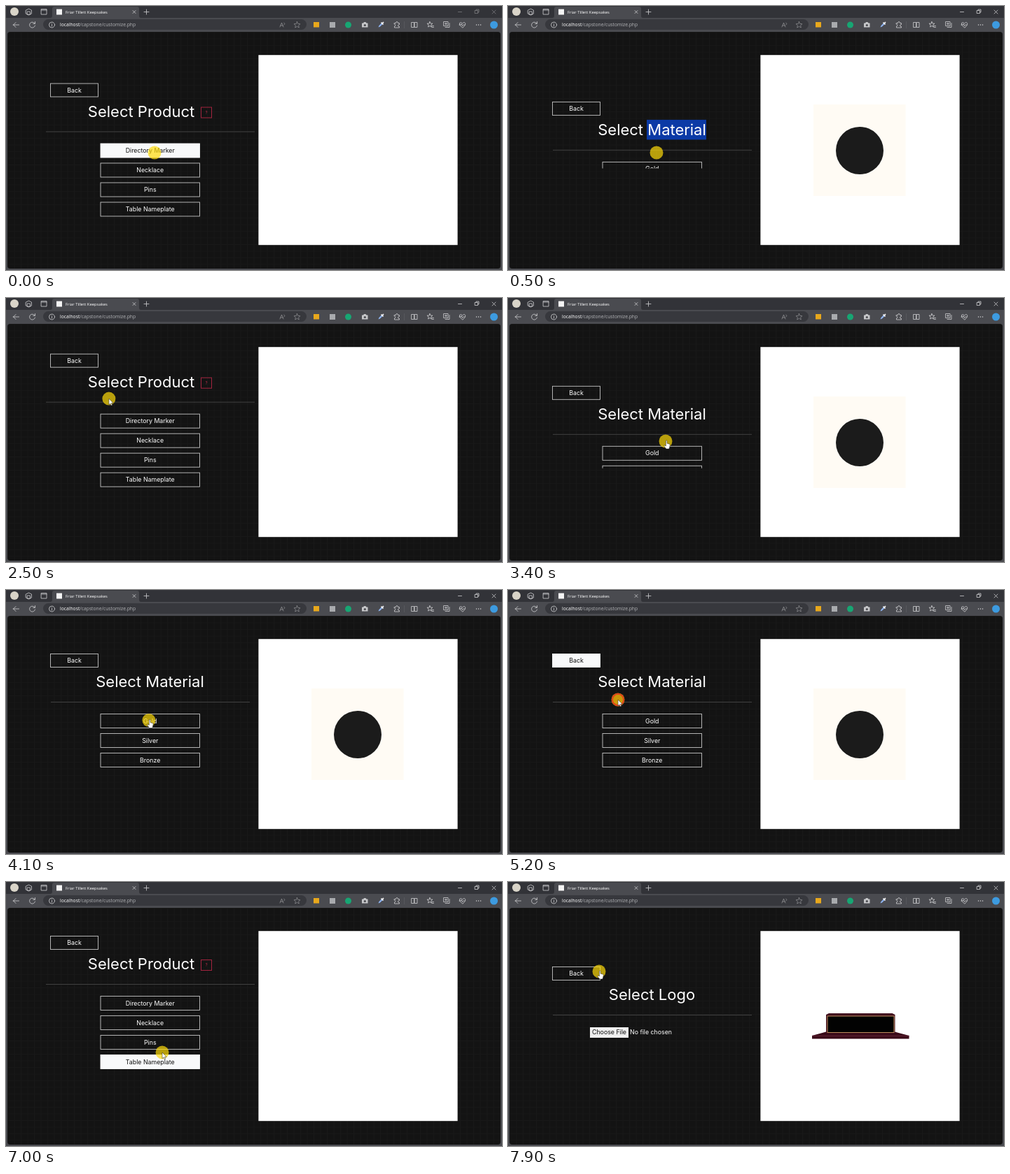
Write an HTML page that moves like this. It is 708 px wide and 378 px high and loops after 8 s.

```html
<!DOCTYPE html>
<html lang="en">
<head>
<meta charset="utf-8">
<title>Product customizer</title>
<style>
  html, body { margin: 0; width: 100%; height: 100%; overflow: hidden; background: #4a4b50; }
  svg { display: block; width: 708px; height: 378px; }
  text { font-family: Inter, "Open Sans", sans-serif; font-size: 8.8px; fill: #fff; }
  .title { font-size: 22px; }
  .mid { text-anchor: middle; }
  .ui { font-family: "Open Sans", "Noto Sans", sans-serif; }
  .btn rect { fill: none; stroke: #c4c4c4; stroke-width: .9; }
  .btn.hot rect { fill: #f8f9fa; stroke: #f8f9fa; }
  .btn.hot text { fill: #111; }
  .line { stroke: #404040; }
  .icon { fill: none; stroke: #d0d0d2; stroke-width: .8; stroke-linejoin: round; stroke-linecap: round; }
  .dim { opacity: .45; }
  .off { display: none; }
</style>
</head>
<body>
<svg viewBox="0 0 708 378">
  <defs>
    <pattern id="grid" width="9.5" height="9.5" patternUnits="userSpaceOnUse" x="2" y="37">
      <path d="M0 .5H9.5M.5 0V9.5" stroke="#fff" stroke-opacity=".02"/>
    </pattern>
  </defs>

  <!-- browser frame -->
  <rect width="708" height="378" fill="#4a4b50"/>
  <rect width="708" height="17" fill="#323338"/>
  <path d="M63 17q3 0 3-3V4q0-3 3-3H187q3 0 3 3V14q0 3 3 3z" fill="#4a4b50"/>
  <circle cx="12" cy="8" r="6" fill="#d9d4c8"/>
  <rect x="72" y="4.500" width="8" height="8" fill="#f4f4f4"/>
  <text class="ui" x="85" y="10.600" style="font-size:5.9px">Friar Tillett Keepsakes</text>
  <g class="icon">
    <path d="M28.500 6l4-2 4 2v5l-4 2-4-2zM30.500 8h4v4h-4z"/>
    <path d="M50.500 4.500h7.500v7.500h-7.500zM50.500 6h7.500"/>
    <path d="M181 6.500l4 4m0-4l-4 4M197 8.500h7m-3.500-3.500v7"/>
    <path d="M10.500 27h8m-8 0l3.500-3.500m-3.500 3.500l3.500 3.500"/>
    <path d="M41 25a4 4 0 1 0 .5 3M41.500 22.500v2.800h-2.800"/>
  </g>
  <g id="controls" class="icon">
    <path d="M645.500 8.500h5M669.500 6.500h4v4h-4zM671 6v-1h4v4h-1M694 6l5 5m0-5l-5 5"/>
  </g>
  <rect x="53" y="19" width="376" height="15" rx="7.500" fill="#37383d"/>
  <g class="icon">
    <circle cx="65.500" cy="27" r="4"/>
    <path d="M65.500 26.500v2.500M65.500 25v.1"/>
    <path d="M391 30l2.500-6 2.500 6m-4-2h3M397 24q2 1.500 0 3" opacity=".55"/>
    <path d="M415.500 22.500l1.300 2.900 3.200.3-2.400 2.100.7 3.200-2.800-1.700-2.800 1.700.7-3.200-2.400-2.100 3.200-.3z" opacity=".5"/>
  </g>
  <text class="ui" x="77" y="29.300" style="font-size:6.75px">localhost<tspan fill="#b4b5b8">/capstone/customize.php</tspan></text>
  <rect x="439" y="23" width="8" height="7.500" fill="#e8a81c"/>
  <rect x="462" y="23" width="8" height="8" fill="#a9abae"/>
  <circle cx="488.500" cy="27" r="4.500" fill="#17a673"/>
  <path d="M508 24.500h2l1-1.500h2.500l1 1.500h2v6h-8.500z" fill="#c6c7c9"/>
  <circle cx="512.300" cy="27.500" r="1.600" fill="#4a4b50"/>
  <path d="M531.500 30.500l1-2.500 4-4 1.500 1.500-4 4z" fill="#8fb4f0"/>
  <path d="M535.500 23.500l3 3M537.500 24.500l1.500-1.500" stroke="#fff" stroke-width="1.600"/>
  <g class="icon">
    <path d="M554.500 24.500h2q0-2 1.500-2t1.500 2h2v2q-2 0-2 1.500t2 1.500v1.500h-7v-2q1.500 0 1.500-1.500t-1.500-1.500z"/>
    <path d="M579 23.500h3.500v7h-3.500zM583.500 23.500h3.500v7h-3.500z"/>
    <path d="M605 22.500l1.200 2.600h2.800l-2.200 2 .6 2.900-2.400-1.500-2.400 1.500.6-2.900-2.200-2h2.800zM608 28.500h2.500m-2.500 2h2.500"/>
    <path d="M625 22.500h6v6h-6zM627 30.500h6v-6M628 24v3m-1.500-1.500h3"/>
    <path d="M651.500 31l-4-4q-1-3.500 2-3.500l2 1.500 2-1.500q3 0 2 3.500zM647 27h2l1-1.500 1.500 3 1-1.500h2"/>
    <path d="M671.500 27h.1m2.900 0h.1m2.900 0h.1" stroke-width="1.400"/>
  </g>
  <path d="M568.500 22v10" stroke="#606166" stroke-width=".6"/>
  <circle cx="696.500" cy="27" r="5.500" fill="#3d9be0"/>

  <!-- page -->
  <rect x="2" y="37" width="704" height="339" rx="4" fill="#131313"/>
  <rect x="2" y="37" width="704" height="339" rx="4" fill="url(#grid)"/>
  <rect x="360.400" y="70.200" width="284.200" height="272" fill="#fff"/>
  <g id="emblem">
    <rect x="436" y="141" width="131.500" height="131" fill="#fffbf4"/>
    <circle cx="502" cy="207" r="34" fill="#1b1b1b"/>
  </g>
  <g id="plate">
    <path d="M434 220l20-5.500h98l20.500 5.500v4.500h-138.500z" fill="#3a0a19"/>
    <path d="M434 220.300h138.500" stroke="#6d2a3c" stroke-width=".8"/>
    <path d="M458 188h90.500l4 2v26h-98.500v-26z" fill="#42101f"/>
    <rect x="456" y="192" width="95" height="23.500" fill="#020202" stroke="#bd8c5c"/>
  </g>
  <g id="panels"></g>

  <!-- pointer -->
  <g id="pointer">
    <circle r="9.500" fill="#ffdc0a" fill-opacity=".7"/>
    <circle id="ring" r="8.200" fill="#ff8000" fill-opacity=".25" stroke="#e2401c" stroke-width="2"/>
    <path id="hand" d="M.4-.5q1-1 1.700 0v3.700l3.200.8q1 .3.900 1.500l-.6 3.500-.8 2h-4l-2.800-3.700q-.6-1.300.5-1.400l1.900 1z" fill="#fff" stroke="#222" stroke-width=".5"/>
    <path id="arrow" d="M0 0v8.800l2-1.900 1.300 3 1.400-.6-1.300-2.900h2.800z" fill="#fff" stroke="#222" stroke-width=".5"/>
  </g>
</svg>

<script>
const $ = id => document.getElementById(id);
const LOOP = 8000, SLIDE = 400;

const button = (id, x, y, w, h, label) =>
  `<g class="btn" id="${id}"><rect x="${x}" y="${y}" width="${w}" height="${h}"/>
   <text class="mid" x="${x + w / 2}" y="${y + h / 2 + 3}">${label}</text></g>`;

const options = (key, top, labels) =>
  labels.map((s, i) => button(key + i, 135, top + 86 + 28 * i, 141.5, 20, s)).join('');

// A panel: back button, heading, rule and a list that slides open
function panel(key, top, x1, x2, heading, list, extra = '') {
  return `<g id="${key}">${extra}
    ${button(key + 'Back', 63.5, top, 68, 19, 'Back')}
    ${heading(top + 47.5)}
    <path class="line" d="M${x1} ${top + 69}H${x2}"/>
    <clipPath id="${key}Clip"><rect id="${key}View" x="50" y="${top + 69}" width="310" height="0"/></clipPath>
    <g clip-path="url(#${key}Clip)">${list}</g></g>`;
}
const centred = s => y => `<text class="title mid" x="205.500" y="${y}">${s}</text>`;

const product = panel('product', 77.5, 57, 355,
  y => `<text class="title" x="116.800" y="${y}">Select Product</text>
    <rect x="278.500" y="111.500" width="15" height="15" fill="none" stroke="#a3243f"/>
    <text class="mid" x="286" y="121.300" style="font-size:6px;fill:#c22b4a">?</text>`,
  options('product', 77.5, ['Directory Marker', 'Necklace', 'Pins', 'Table Nameplate']));
const material = panel('material', 91.5, 64, 348, centred('Select Material'),
  options('material', 91.5, ['Gold', 'Silver', 'Bronze']),
  '<rect id="mark" x="198" y="117" width="85" height="28.500" fill="#0b3aa6"/>');
const logo = panel('logo', 121.5, 64, 348, centred('Select Logo'),
  `<rect x="117" y="208" width="55" height="15" fill="#efefef"/>
   <text class="mid" x="144.500" y="218.300" style="fill:#111">Choose File</text>
   <text x="174" y="218.300">No file chosen</text>`);
$('panels').innerHTML = product + material + logo;

const height = { product: 146, material: 118, logo: 57 };
const scenes = [
  [0, 'product'], [376, 'material', 'emblem'], [2150, 'product'],
  [3224, 'material', 'emblem'], [5210, 'product'], [7050, 'logo', 'plate']
];
const hovers = [
  ['product0', 0, 376], ['materialBack', 1800, 2150], ['product1', 2950, 3224],
  ['material1', 3650, 4000], ['materialBack', 4750, 5210], ['product3', 6320, 7050]
];
const clicks = [[2030, 2150], [3080, 3200], [5100, 5230], [6650, 6780]];
const path = [
  [0, 212, 210, ''], [700, 212, 210, 'arrow'], [1150, 130, 147, 'arrow'], [1350, 126, 145, 'arrow'],
  [1650, 85, 99, 'hand'], [2200, 85, 99, 'arrow'], [2850, 225, 201, 'hand'], [3100, 225, 205, 'hand'],
  [3900, 225, 205, 'hand'], [4600, 114, 108, 'hand'], [4980, 114, 108, 'arrow'], [5180, 157, 157, 'arrow'],
  [5650, 157, 157, 'arrow'], [6080, 223, 249, 'hand'], [7000, 223, 244, 'arrow'], [7200, 220, 228, 'arrow'],
  [7850, 130, 128, 'hand'], [8000, 130, 128, 'hand']
];

const swing = u => .5 - Math.cos(Math.PI * Math.min(1, Math.max(0, u))) / 2;
const show = (id, on) => $(id).classList.toggle('off', !on);
const within = (t, a, b) => t >= a && t < b;

function drawPanels(t) {
  const [start, name, art] = scenes.filter(s => s[0] <= t).pop();
  const full = height[name];
  const open = start ? full * swing((t - start) / SLIDE) : full;
  const shift = start ? (full - open) / 2 : 33.5;
  for (const key in height) show(key, key === name);
  $(name).setAttribute('transform', `translate(0 ${shift})`);
  $(name + 'View').setAttribute('height', open);
  show('emblem', art === 'emblem');
  show('plate', art === 'plate');
  show('mark', t < 1250);
}

function drawPointer(t) {
  const i = path.findIndex(k => k[0] > t);
  const [t0, x0, y0, kind] = path[i - 1], [t1, x1, y1] = path[i];
  const u = swing((t - t0) / (t1 - t0));
  $('pointer').setAttribute('transform', `translate(${x0 + (x1 - x0) * u} ${y0 + (y1 - y0) * u})`);
  show('hand', kind === 'hand');
  show('arrow', kind === 'arrow');
  show('ring', clicks.some(([a, b]) => within(t, a, b)));
}

function render(t) {
  drawPanels(t);
  for (const [id] of hovers)
    $(id).classList.toggle('hot', hovers.some(([k, a, b]) => k === id && within(t, a, b)));
  drawPointer(t);
  $('controls').classList.toggle('dim', t < 100);
}

const begin = performance.now();
function tick() {
  render((performance.now() - begin) % LOOP);
  requestAnimationFrame(tick);
}
tick();
</script>
</body>
</html>
```
